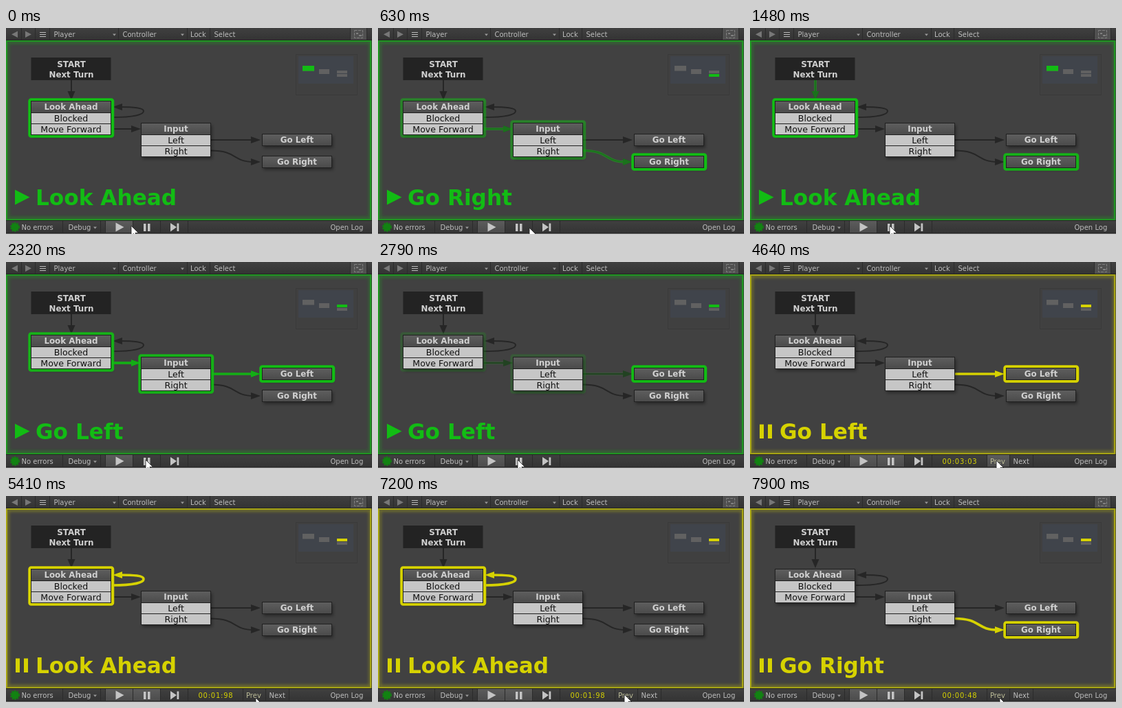
Recreate the animation shown at these times as an HTML page. Size 532 by 300 pixels, loop 8 s.

```html
<!DOCTYPE html>
<html>
<head>
<meta charset="utf-8">
<style>
html, body { margin: 0; width: 100%; height: 100%; overflow: hidden; background: #414141; }
svg { display: block; width: 532px; height: 300px; --c: #12bc14; }
svg.paused { --c: #d6d200; }
text { font-family: "DejaVu Sans", Verdana, sans-serif; font-size: 10px; fill: #bebebe; white-space: pre; }
.head { font-size: 11.9px; font-weight: bold; fill: #d0d0d0; text-anchor: middle; }
.row { font-size: 12.6px; fill: #111; text-anchor: middle; }
.hot { fill: var(--c); }
.line { fill: none; stroke: var(--c); }
#title { font-size: 31.2px; font-weight: bold; }
#clock { letter-spacing: .75px; }
.icon { fill: #c4c4c4; }
</style>
</head>
<body>
<svg id="stage" viewBox="0 0 532 300">
  <defs>
    <linearGradient id="bar" x2="0" y2="1"><stop stop-color="#404040"/><stop offset="1" stop-color="#333"/></linearGradient>
    <linearGradient id="down" x2="0" y2="1"><stop stop-color="#5c5c5c"/><stop offset="1" stop-color="#4c4c4c"/></linearGradient>
    <linearGradient id="cap" x2="0" y2="1"><stop stop-color="#5e5e5e"/><stop offset="1" stop-color="#4b4b4b"/></linearGradient>
    <filter id="soft" x="-20%" y="-40%" width="140%" height="180%"><feGaussianBlur stdDeviation="2"/></filter>
  </defs>
  <rect width="532" height="300" fill="#414141"/>
  <rect class="line" x="2" y="20.5" width="528" height="257" stroke-width="5" opacity=".32" filter="url(#soft)"/>
  <rect class="line" x="1" y="19" width="529" height="260" stroke-width="2" opacity=".6"/>

  <rect x="421.5" y="38.5" width="89" height="59" fill="#404040" stroke="#3a3a3a"/>
  <rect x="425" y="41" width="80" height="40" fill="#40444b"/>
  <g id="map"></g>

  <g id="edges"></g>
  <g id="nodes"></g>

  <path id="playMark" class="hot" d="M13 235.5 34.5 246.5 13 257.5Z"/>
  <path id="pauseMark" class="hot" d="M14 236.5h6v20.5h-6zM26 236.5h6v20.5h-6z"/>
  <text id="title" class="hot" x="43" y="258"></text>

  <g id="bars">
    <rect width="532" height="18" fill="url(#bar)"/>
    <rect y="17" width="532" height="1" fill="#242424"/>
    <rect y="280" width="532" height="20" fill="url(#bar)"/>
    <rect y="280" width="532" height="1" fill="#242424"/>
    <rect x="145" y="281" width="39" height="17" fill="url(#down)"/>
    <rect id="pauseDown" x="185" y="281" width="39" height="17" fill="url(#down)"/>
    <rect id="prevDown" x="345" y="281" width="32" height="17" fill="url(#down)"/>
    <rect y="298" width="532" height="1" fill="#262626"/>
    <rect y="299" width="532" height="1" fill="#6a6a6a"/>
    <path d="M17 4.5V14L8 9.2ZM28 4.5V14L37 9.2Z" fill="#777"/>
    <path d="M49 6.5h9M49 9.5h9M49 12.5h9" stroke="#bbb"/>
    <path d="M155 8.5h5l-2.5 3zM254 8.5h5l-2.5 3zM127 289.5h5l-2.5 3z" fill="#999"/>
    <rect x="501" y="0" width="23" height="17" fill="#505050"/>
    <rect x="506.5" y="3.5" width="12" height="11" fill="none" stroke="#808080" stroke-dasharray="4 1.5"/>
    <path d="M509 7h3v2h-3zM513 10h4v2h-4z" fill="#808080"/>
    <circle cx="13" cy="290" r="5.7" fill="#128212"/>
    <circle cx="13" cy="290" r="6.3" fill="none" stroke="#128212" stroke-width="1.5" stroke-dasharray="2.2 1.8"/>
    <path class="icon" d="M159.500 283.500 171.500 290 159.500 296.500ZM200 285h3.500v11h-3.500zM206 285h3.500v11h-3.500zM239 284 248 290 239 296.500ZM248.500 284.500h2.800v11.500h-2.800z"/>
  </g>
  <g id="pauseTools">
    <text id="clock" class="hot" x="279.5" y="294"></text>
    <text id="prev" x="349" y="294">Prev</text>
    <text x="382.5" y="294">Next</text>
  </g>
  <path id="cursor" d="M0 0V14.500L3.400 11.400 5.800 17 8.300 16 5.900 10.500H10.500Z" fill="#fff" stroke="#222" stroke-width=".8"/>
</svg>
<script>
const $ = id => document.getElementById(id);
const stage = $('stage');

function add(parent, tag, attrs, text) {
  const el = document.createElementNS('http://www.w3.org/2000/svg', tag);
  for (const key in attrs) el.setAttribute(key, attrs[key]);
  if (text) el.textContent = text;
  return parent.appendChild(el);
}

// Toolbars
[['Player', 69.5, 13], ['Controller', 169.5, 13], ['Lock', 268, 13], ['Select', 302.5, 13],
 ['No errors', 22.5, 294], ['Debug', 90.5, 294], ['Open Log', 471.5, 294]]
  .forEach(([s, x, y]) => add($('bars'), 'text', { x, y }, s));
for (const x of [22, 42, 63, 163, 263, 296, 500, 524])
  add($('bars'), 'rect', { x, y: 0, width: 1, height: 17, fill: '#2b2b2b' });
for (const x of [82, 137, 144, 184, 224, 264])
  add($('bars'), 'rect', { x, y: 281, width: 1, height: 17, fill: '#2b2b2b' });
for (const x of [344, 377, 411])
  add($('pauseTools'), 'rect', { x, y: 281, width: 1, height: 17, fill: '#2b2b2b' });

// Graph nodes: x, y, width, height, caption, rows, minimap box
const nodes = {
  look: [36.5, 106.5, 116, 49, 'Look Ahead', ['Blocked', 'Move Forward'], [431, 55, 17, 7.5]],
  input: [196.5, 138.5, 101, 49, 'Input', ['Left', 'Right'], [455, 60, 15, 7]],
  left: [372.5, 154.5, 101, 17, 'Go Left', [], [481, 62, 15, 4]],
  right: [372.5, 186.5, 101, 17, 'Go Right', [], [481, 67, 15, 4]]
};
const outlines = {}, dots = {};

add($('nodes'), 'rect', { x: 36.5, y: 43, width: 116, height: 33, fill: '#232323' });
add($('nodes'), 'text', { x: 95, y: 57, class: 'head' }, 'START');
add($('nodes'), 'text', { x: 95, y: 72, class: 'head' }, 'Next Turn');

for (const id in nodes) {
  const [x, y, width, height, name, rows, [mx, my, mw, mh]] = nodes[id], mid = x + width / 2;
  const g = $('nodes');
  add(g, 'rect', { x: x + 2, y: y + 3, width, height, fill: '#000', opacity: .4, filter: 'url(#soft)' });
  outlines[id] = add(g, 'rect', { x: x - 2, y: y - 2, width: width + 4.5, height: height + 4, rx: 2, class: 'line', 'stroke-width': 4.5 });
  add(g, 'rect', { x, y, width, height, fill: '#c6c6c6', stroke: '#202020' });
  add(g, 'rect', { x: x + .5, y: y + .5, width: width - 1, height: 16, fill: 'url(#cap)' });
  add(g, 'text', { x: mid, y: y + 12.7, class: 'head' }, name);
  rows.forEach((s, i) => {
    add(g, 'rect', { x, y: y + 16.5 + i * 16, width, height: 1, fill: '#202020' });
    add(g, 'text', { x: mid, y: y + 29.3 + i * 16, class: 'row' }, s);
  });
  add($('map'), 'rect', { x: mx, y: my, width: mw, height: mh, fill: '#616161' });
  dots[id] = add($('map'), 'rect', { x: mx, y: my, width: mw, height: mh, class: 'hot' });
}

// Arrows: line and head
const paths = {
  start: ['M95 76V95', 'M95 105 89.500 92H100.500Z'],
  loop: ['M154 130C186 130 200 126 200 121C200 116 186 115 165 115', 'M155 115 169 110 169 120Z'],
  move: ['M154 147H186', 'M196 147 182 142V152Z'],
  left: ['M298 163H360', 'M370 163 356 158V168Z'],
  right: ['M298 178.500C336 178.500 329 195 360 195', 'M370 195 356 190V200Z']
};
const lit = {};
for (const id in paths) {
  const [d, tip] = paths[id];
  add($('edges'), 'path', { d, fill: 'none', stroke: '#262626', 'stroke-width': 2 });
  add($('edges'), 'path', { d: tip, fill: '#262626' });
  lit[id] = add($('edges'), 'g', {});
  add(lit[id], 'path', { d, class: 'line', 'stroke-width': 3.7 });
  add(lit[id], 'path', { d: tip, class: 'hot' });
}

// While running: time, active node, then what fades out
const running = [
  [-9999, 'look', {}, {}],
  [90, 'right', { look: 1, input: 1 }, { move: 1, right: 1 }],
  [1240, 'look', { right: 1 }, { start: .55 }],
  [2090, 'left', { look: 1, input: 1 }, { move: 1, left: 1 }]
];
// While paused: time, node, arrow, clock
const history = [
  [2930, 'left', 'left', '03:03'],
  [4800, 'input', 'move', '03:01'],
  [5410, 'look', 'loop', '01:98'],
  [7370, 'look', 'start', '01:96'],
  [7900, 'right', 'right', '00:48']
];
const mouse = [
  [0, 182, 288], [90, 184, 289], [630, 220, 291], [860, 211, 292], [1010, 209, 292],
  [1240, 203, 288], [3479, 203, 288], [3480, 224, 284], [4110, 362, 295], [4490, 363, 296]
];
const presses = [[4640, 4800], [5260, 5410], [7200, 7370], [7750, 7900]];
const STEP = 77, FADE = 770;

const latest = (list, t) => list.filter(e => e[0] <= t).pop();
const show = (el, on) => el.setAttribute('opacity', +on);

function mouseAt(t) {
  if (presses.some(([a, b]) => t >= a && t < b)) return [358, 289];
  if (t >= 4640) return [363, 294];
  const i = mouse.findLastIndex(m => m[0] <= t), a = mouse[i], b = mouse[i + 1];
  if (!b) return a.slice(1);
  // hold each position for one step, as a screen capture does
  const held = Math.floor((t - a[0]) / STEP) * STEP;
  const k = held / (b[0] - a[0]);
  return [a[1] + (b[1] - a[1]) * k, a[2] + (b[2] - a[2]) * k];
}

function draw(t) {
  const paused = t >= 2930;
  let active, current, boxes = {}, arrows = {};
  if (paused) {
    const [, node, arrow, clock] = latest(history, t);
    active = node;
    current = 'left';
    arrows[arrow] = 1;
    $('clock').textContent = '00:' + clock;
  } else {
    const [from, node, oldBoxes, oldArrows] = latest(running, t);
    const age = Math.floor((t - from) / STEP) * STEP;
    const fade = Math.max(0, 1 - (age / FADE) ** 2);
    active = current = node;
    for (const id in oldBoxes) boxes[id] = oldBoxes[id] * fade;
    for (const id in oldArrows) arrows[id] = oldArrows[id] * fade;
  }
  boxes[active] = 1;
  for (const id in nodes) {
    show(outlines[id], boxes[id] || 0);
    show(dots[id], id === current);
  }
  for (const id in lit) show(lit[id], arrows[id] || 0);
  stage.classList.toggle('paused', paused);
  show($('playMark'), !paused);
  for (const id of ['pauseMark', 'pauseTools', 'pauseDown']) show($(id), paused);
  show($('prevDown'), t >= 4640 && t < 4800);
  $('prev').style.fill = t >= 4640 ? '#bcbc98' : '';
  $('title').textContent = nodes[active][4];
  $('cursor').setAttribute('transform', `translate(${mouseAt(t)})`);
}

const begin = performance.now();
function tick() {
  draw((performance.now() - begin) % 8000);
  requestAnimationFrame(tick);
}
tick();
</script>
</body>
</html>
```
